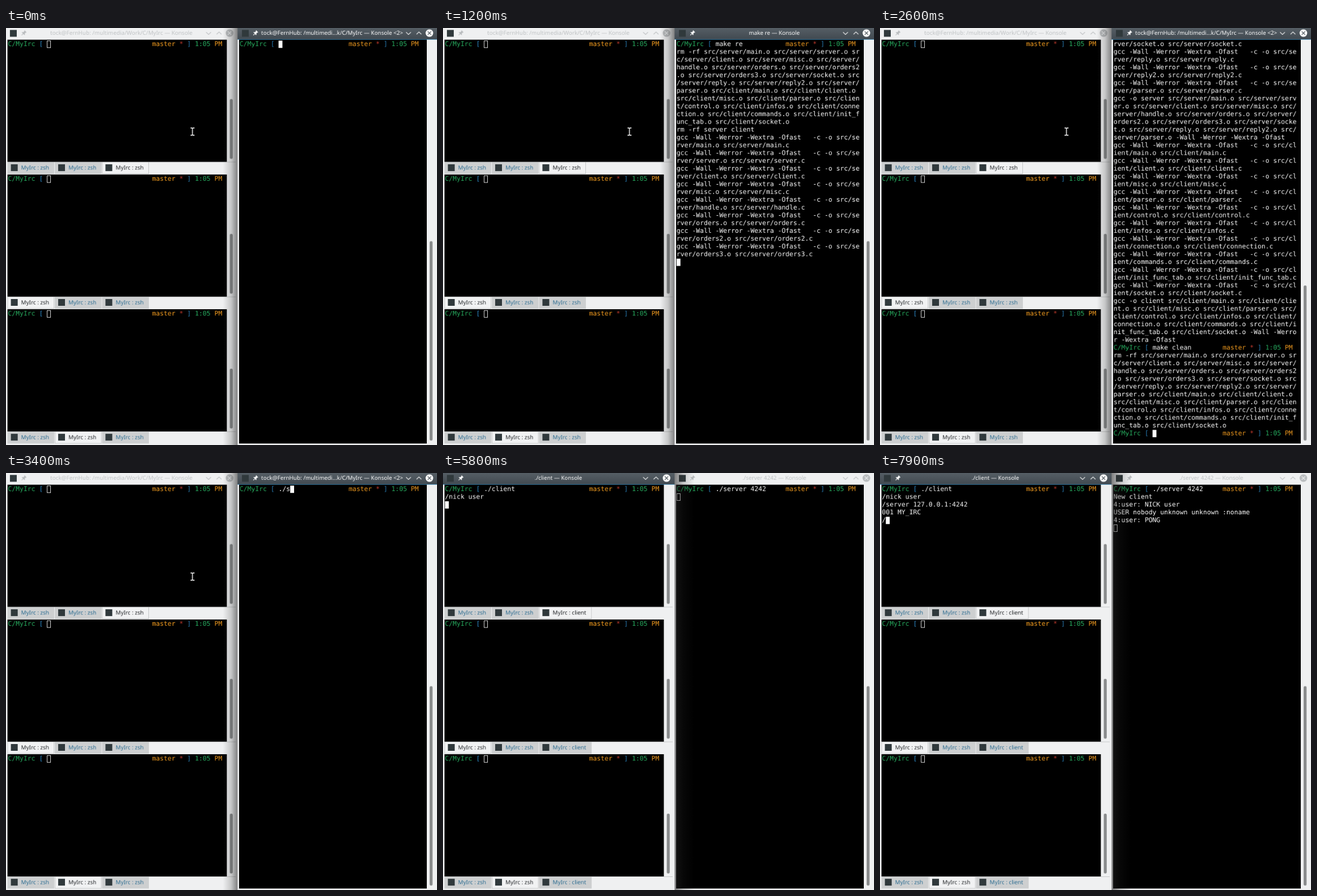
Recreate the animation shown at these times as an HTML page. Size 760 by 737 pixels, loop 8000 ms.

```html
<!DOCTYPE html>
<html lang="en">
<head>
<meta charset="utf-8">
<title>Terminal session</title>
<style>
html, body { margin: 0; width: 100%; height: 100%; overflow: hidden; background: #eff0f1; }
/* Laid out on an 884 x 857 desktop, shown at 760 x 737 */
#stage { position: absolute; left: 0; top: 0; width: 884px; height: 857px; overflow: hidden;
  background: #eff0f1; transform: scale(.8597, .86); transform-origin: 0 0;
  will-change: transform; text-rendering: geometricPrecision; }
#stage div, #stage pre, #stage svg { position: absolute; }
svg { left: 0; top: 0; overflow: visible; }
.term { background: #000; overflow: hidden; }
pre { margin: 0; left: 1px; top: 2px; color: #fcfcfc;
  font: 13.288px/16px "DejaVu Sans Mono", monospace; }
pre i { font-style: normal; }
.g { color: #27ae60; } .b { color: #2980b9; } .o { color: #f39c1f; } .r { color: #c0392b; }
.cursor { box-sizing: border-box; width: 8px; height: 15px; border: 1px solid #fcfcfc; }
.cursor.on { background: #fcfcfc; }
.bar { top: 0; height: 24px; background: #eff0f1; color: #bfc2c4; }
.bar.on { background: linear-gradient(#555e65, #414950); color: #fcfcfc; }
.bar.on::after { content: ""; position: absolute; left: 0; right: 0; bottom: 0; height: 1px; background: #3287b8; }
.name { top: 0; line-height: 22px; white-space: pre; transform: translateX(-50%); }
.name, .tab { font-family: "Noto Sans", sans-serif; font-size: 11.53px; }
.app { width: 14px; height: 14px; background: #30393c; }
.tab { box-sizing: border-box; height: 24px; line-height: 24px; padding-left: 28px;
  background: #cdcfd0; color: #2b6b90; white-space: pre; }
.tab.on { background: #f1f2f3; color: #232629; border: solid #c3c5c6; border-width: 0 1px 1px;
  padding-left: 27px; }
.line { left: 3px; width: 468px; height: 1px; background: #bfc1c2; }
.thumb { width: 6px; border-radius: 3px; background: #898b8c; }
.shade { top: 0; height: 857px; }
</style>
</head>
<body>
<div id="stage"></div>
<script>
const STEP = 100, LOOP = 8000, ROWS = 51, COLS = 47;
const stage = document.getElementById('stage');

function add(parent, cls, box = {}, tag = 'div') {
  const el = document.createElement(tag);
  el.className = cls;
  for (const key in box) el.style[key] = box[key] + 'px';
  parent.append(el);
  return el;
}

function drawing(parent, markup) {
  parent.insertAdjacentHTML('beforeend', `<svg width="1" height="1" fill="none">${markup}</svg>`);
  return parent.lastElementChild;
}

// Terminals

function makeTerm(left, top, width, height, cols) {
  const el = add(stage, 'term', { left, top, width, height });
  const pre = add(el, '', {}, 'pre');
  const cursor = add(el, 'cursor');
  return {
    show(rows, input, active) {
      let row = rows.length, col = 0;
      if (input !== null) {
        rows = [...rows, input.shell ? prompt(input.text, cols) : input.text];
        col = input.text.length + (input.shell ? 10 : 0);
      }
      const skip = Math.max(0, row - ROWS + 1);
      row -= skip;
      pre.innerHTML = rows.slice(skip).join('\n');
      cursor.className = active ? 'cursor on' : 'cursor';
      cursor.style.left = 1 + col * 8 + 'px';
      cursor.style.top = 2 + row * 16 + 'px';
      return skip;
    }
  };
}

const ink = (cls, text) => `<i class="${cls}">${text}</i>`;

function prompt(cmd, cols) {
  return [ink('g', 'C/MyIrc'), ink('b', '['),
    cmd.padEnd(cols - 29) + ink('o', 'master'), ink('r', '*'), ink('b', ']'),
    ink('g', '1:05'), ink('o', 'PM')].join(' ');
}

const shell = text => ({ shell: true, text });
const plain = text => ({ shell: false, text });

// Part of a text typed by step k; counts holds its length from step start on
function typed(text, k, start, counts) {
  return k < start ? '' : text.slice(0, counts[k - start] ?? text.length);
}

// Build output

const wrap = text => text.match(new RegExp(`.{1,${COLS}}`, 'g'));
const FLAGS = '-Wall -Werror -Wextra -Ofast';
const parts = {
  server: 'main server client misc handle orders orders2 orders3 socket reply reply2 parser'.split(' '),
  client: 'main client misc parser control infos connection commands init_func_tab socket'.split(' ')
};
const objects = dir => parts[dir].map(name => `src/${dir}/${name}.o`).join(' ');
const compile = dir => [
  ...parts[dir].map(name => `gcc ${FLAGS}   -c -o src/${dir}/${name}.o src/${dir}/${name}.c`),
  `gcc -o ${dir} ${objects(dir)} ${FLAGS}`
];
const wipe = wrap(`rm -rf ${objects('server')} ${objects('client')}`);
const build = [wipe, ['rm -rf server client'],
  ...[...compile('server'), ...compile('client')].map(wrap)];
const buildPace = [3, 5, 7, 8, 10, 13, 19];

function rightState(k) {
  if (k < 32) {
    const first = typed('make re', k, 1, [1, 2, 3, 4, 5, 6, 7]);
    if (k < 8) return [[], shell(first)];
    const rows = [prompt(first, COLS), ...build.slice(0, buildPace[k - 8]).flat()];
    if (k < 16) return [rows, null];
    const clean = typed('make clean', k, 17, [1, 2, 3, 4, 5, 6, 7, 8, 10]);
    if (k < 26) return [rows, shell(clean)];
    rows.push(prompt(clean, COLS), ...wipe);
    return [rows, shell(typed('clear', k, 27, [1, 2, 3, 4, 5]))];
  }
  const run = typed('./server 4242', k, 33, [1, 3, 9, 10, 12, 13]);
  if (k < 39) return [[], shell(run)];
  const rows = [prompt(run, COLS)];
  if (k >= 77) rows.push('New client', '4:user: NICK user', 'USER nobody unknown unknown :noname');
  if (k >= 78) rows.push('4:user: PONG');
  return [rows, null];
}

function leftState(k) {
  const run = typed('./client', k, 43, [1, 2, 3, 4, 5, 6, 8]);
  if (k < 50) return [[], shell(run)];
  const rows = [prompt(run, 56)];
  const nick = typed('/nick user', k, 51, [1, 2, 3, 4, 6, 8, 10]);
  if (k < 58) return [rows, plain(nick)];
  rows.push(nick);
  const join = typed('/server 127.0.0.1:4242', k, 59,
    [1, 2, 3, 4, 5, 7, 8, 9, 10, 12, 13, 14, 16, 17, 18, 20, 21, 22]);
  if (k < 77) return [rows, plain(join)];
  rows.push(join);
  if (k >= 78) rows.push('001 MY_IRC');
  return [rows, plain(k >= 79 ? '/' : '')];
}

// Window frames

function makeBar(left, width, active, icons) {
  const bar = add(stage, active ? 'bar on' : 'bar', { left, width });
  const fg = active ? '#fcfcfc' : '#b9bcbe', bg = active ? '#414950' : '#eff0f1';
  const [app, pin, down, up, close] = icons;
  add(bar, 'app', { left: app, top: 4 });
  const name = add(bar, 'name');
  drawing(bar, `
    <g transform="translate(${pin} 10.5) rotate(45) scale(1.16)" fill="${fg}">
      <path d="M-2.4-4.5h4.8v1.2h-.7v2.6l1.7 1.4v1h-6.8v-1l1.7-1.4v-2.6h-.7z"/>
      <path d="M-.5 1.5h1v3.8h-1z"/>
    </g>
    <g stroke="${fg}" stroke-width="1.2">
      <path d="M${down - 5} 8.5l5 5 5-5M${up - 5} 13l5-5 5 5"/>
    </g>
    <circle cx="${close}" cy="10.5" r="7.8" fill="${fg}"/>
    <path d="M${close - 3.5} 7l7 7m0-7l-7 7" stroke="${bg}" stroke-width="1.2"/>`);
  return {
    el: bar,
    title(text, x) {
      name.textContent = text;
      name.style.left = x + 'px';
    }
  };
}

function makeTabs(top, current) {
  add(stage, 'line', { top });
  const tabs = [3, 100, 197].map((left, i) => {
    const tab = add(stage, i === current ? 'tab on' : 'tab', { left, top: top + 1, width: 96 });
    add(stage, 'app', { left: left + 7, top: top + 5 });
    tab.textContent = 'MyIrc : zsh';
    return tab;
  });
  return tabs[2];
}

const tops = [24, 301, 578];
const panes = tops.map(top => makeTerm(3, top, 450, 251, 56));
const lastTabs = tops.map((top, i) => makeTabs(top + 251, [2, 0, 1][i]));
for (const top of tops) add(stage, 'thumb', { left: 459, top: top + 122, height: 123 });

const right = makeTerm(478, 24, 385, 830, COLS);
const thumb = add(stage, 'thumb', { left: 869 });

const leftIcons = [8, 36.5, 415.5, 437, 458.5];
const rightIcons = [9, 36.5, 350.5, 372, 393.5];
const leftBars = [false, true].map(on => makeBar(0, 475, on, leftIcons));
const rightBars = [false, true].map(on => makeBar(475, 409, on, rightIcons));

function makeShade(left, width, dir) {
  const el = add(stage, 'shade', { left, width });
  el.style.background = `linear-gradient(to ${dir}, rgba(36,36,36,.55), rgba(36,36,36,.2) 45%, rgba(36,36,36,0))`;
  return el;
}
const leftShade = makeShade(445, 30, 'left');
const rightShade = makeShade(475, 40, 'right');

const pointer = drawing(stage, `
  <path d="M378.5 205.5h2.5l1.5 1 1.5-1h2.5M382.5 206v14M378.5 220.5h2.5l1.5-1 1.5 1h2.5"
    stroke="#f4f4f4" stroke-width="1.8"/>`);

// Playback

const HOST = 'tock@FernHub: ';

function rightTitle(k) {
  if (k >= 39) return ['./server 4242 — Konsole', 204.5];
  if (k >= 8 && k < 16) return ['make re — Konsole', 204.5];
  return [HOST + '/multimedi...k/C/MyIrc — Konsole <2>', 194];
}

function render(k) {
  const focus = k < 40 ? 0 : k === 40 ? .5 : 1;
  const onLeft = focus > 0, client = k >= 50;

  panes[0].show(...leftState(k), onLeft);
  const scroll = right.show(...rightState(k), !onLeft);
  const size = 820 * ROWS / (2 * ROWS + scroll);
  thumb.style.top = 848 - size + 'px';
  thumb.style.height = size + 'px';

  const leftTitle = client ? './client — Konsole' : HOST + '/multimedia/Work/C/MyIrc — Konsole';
  for (const bar of leftBars) bar.title(leftTitle, 236.7);
  for (const bar of rightBars) bar.title(...rightTitle(k));
  leftBars[1].el.style.opacity = rightShade.style.opacity = focus;
  rightBars[1].el.style.opacity = leftShade.style.opacity = 1 - focus;

  for (const tab of lastTabs) {
    tab.textContent = client ? 'MyIrc : client' : 'MyIrc : zsh';
    tab.style.width = (client ? 108 : 96) + 'px';
  }
  pointer.style.display = k < 43 ? '' : 'none';
}

panes[1].show([], shell(''), false);
panes[2].show([], shell(''), false);

let last = -1;
function tick() {
  const k = Math.floor(performance.now() % LOOP / STEP);
  if (k !== last) render(last = k);
  requestAnimationFrame(tick);
}
tick();
</script>
</body>
</html>
```
